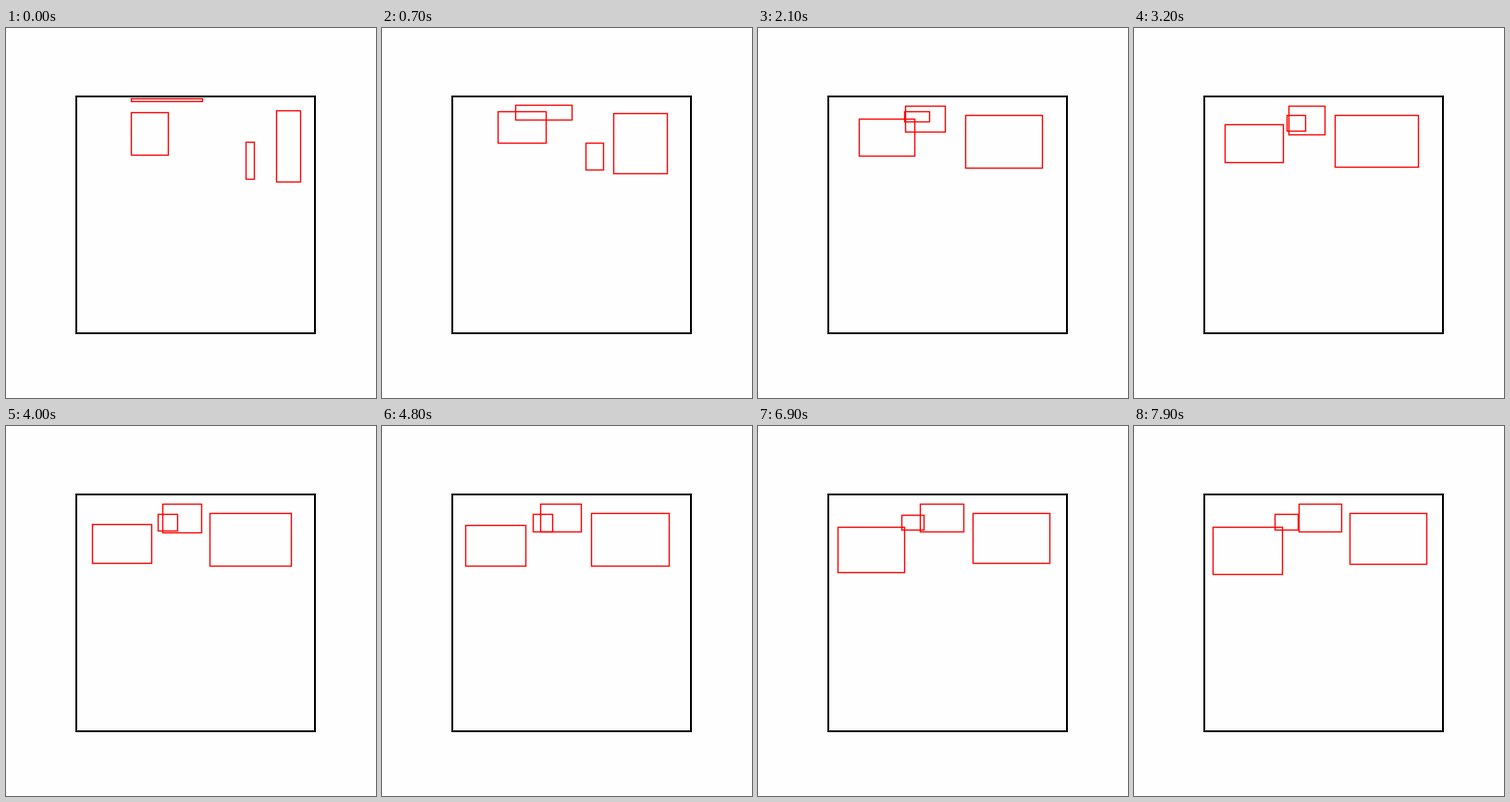
Animation of 400 by 400 pixels, one loop 8000 ms. Source, as an HTML page with a canvas:

```html
<!DOCTYPE html>
<html>
<head>
<meta charset="utf-8">
<style>
html, body { margin: 0; width: 100%; height: 100%; overflow: hidden; background: #fefefe; }
canvas { display: block; }
</style>
</head>
<body>
<canvas id="stage" width="400" height="400"></canvas>
<script>
const ctx = document.getElementById('stage').getContext('2d');
const LOOP = 8000, STEP = 100;
const times = [0, 700, 1500, 2100, 3200, 4800, 5900, 7900];

// Each row holds left, top, right, bottom at the matching time.
const wide = [
  [135, 76, 212, 79], [144, 83, 205, 99], [154, 83, 202, 109], [159, 84, 202, 112],
  [167, 84, 206, 115], [171, 84, 215, 114], [173, 84, 219, 114], [178, 84, 224, 114]
];
const left = [
  [135, 91, 175, 137], [125, 90, 177, 124], [116, 94, 173, 132], [109, 98, 169, 138],
  [98, 104, 161, 145], [90, 107, 155, 151], [87, 108, 156, 155], [85, 109, 160, 160]
];
const small = [
  [259, 123, 268, 163], [220, 124, 239, 153], [176, 77, 201, 92], [158, 90, 185, 101],
  [165, 94, 185, 111], [163, 95, 184, 114], [158, 96, 181, 113], [152, 95, 177, 112]
];
const right = [
  [292, 89, 318, 166], [250, 92, 308, 157], [232, 93, 307, 152], [224, 94, 307, 151],
  [217, 94, 307, 150], [226, 94, 310, 151], [231, 94, 313, 148], [233, 94, 316, 149]
];
const rooms = [wide, left, small, right];

function slope(keys, i, c) {
  return (keys[i + 1][c] - keys[i][c]) / (times[i + 1] - times[i]);
}

// Harmonic mean of neighbouring slopes, so edges never overshoot a key.
function tangent(keys, i, c) {
  if (i === 0) return slope(keys, 0, c);
  if (i === times.length - 1) return slope(keys, i - 1, c);
  const a = slope(keys, i - 1, c), b = slope(keys, i, c);
  return a * b > 0 ? 2 * a * b / (a + b) : 0;
}

function edge(keys, c, t) {
  let i = 0;
  while (i < times.length - 2 && t >= times[i + 1]) i++;
  const span = times[i + 1] - times[i];
  const u = (t - times[i]) / span, v = 1 - u;
  return keys[i][c] * v * v * (1 + 2 * u)
    + keys[i + 1][c] * u * u * (3 - 2 * u)
    + span * u * v * (v * tangent(keys, i, c) - u * tangent(keys, i + 1, c));
}

function box(x0, y0, x1, y1, color, width) {
  ctx.strokeStyle = color;
  ctx.lineWidth = width;
  ctx.strokeRect(x0, y0, x1 - x0, y1 - y0);
}

function draw(now) {
  const t = Math.floor(now % LOOP / STEP) * STEP;
  ctx.fillStyle = '#fefefe';
  ctx.fillRect(0, 0, 400, 400);
  box(76, 74, 334, 330, '#000', 2);
  for (const keys of rooms) {
    const e = [0, 1, 2, 3].map(c => Math.round(edge(keys, c, t)) + 0.5);
    box(...e, '#f00', 1.39);
  }
}

const start = performance.now();
function tick() {
  draw(performance.now() - start);
  requestAnimationFrame(tick);
}
tick();
</script>
</body>
</html>
```
